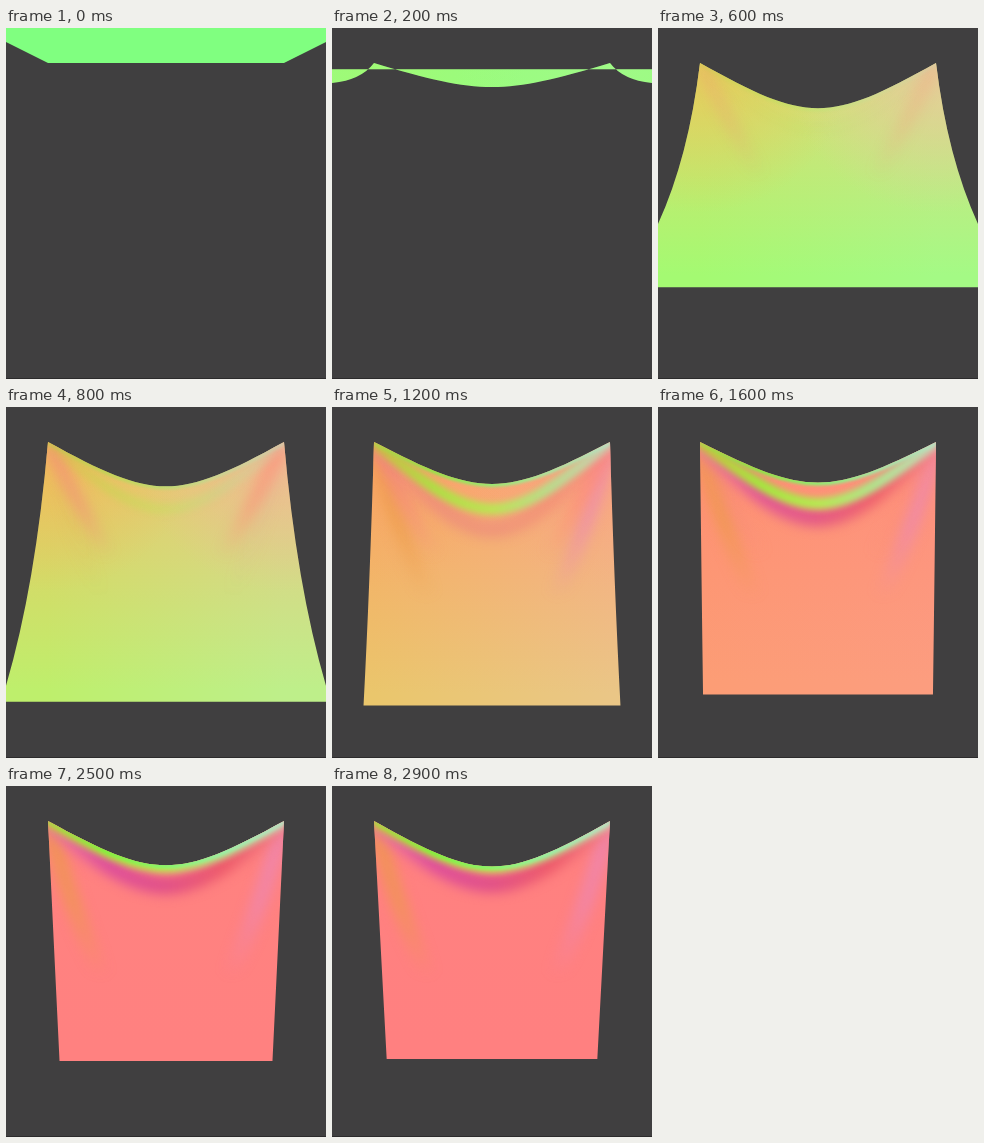
Animation, 320 px wide and 351 px high, one loop 3000 ms. Source, as an HTML page with a canvas:

```html
<!DOCTYPE html>
<html lang="en">
<head>
<meta charset="utf-8">
<title>Falling cloth</title>
<style>
  html, body { margin: 0; width: 100%; height: 100%; overflow: hidden; background: #403f40; }
  canvas { display: block; }
</style>
</head>
<body>
<canvas id="stage" width="320" height="351"></canvas>
<script>
const ctx = document.getElementById('stage').getContext('2d');
const WIDTH = 320, HEIGHT = 351, LOOP = 3000, STEP = 100;
const CENTER = 160, HALF = 118, PIN_Y = 35;
const PIN_L = CENTER - HALF, PIN_R = CENTER + HALF;
const HORIZON = 94, EYE_DISTANCE = 433;

// Timing helpers; t is in seconds.
const settle = (t, rate, power) => 1 - Math.exp(-rate * t ** power);
function rise(t, from, to) {
  const k = Math.min(1, Math.max(0, (t - from) / (to - from)));
  return k * k * (3 - 2 * k);
}
const pulse = (t, from, peak, to) => rise(t, from, peak) * (1 - rise(t, peak, to));

// The hem falls and swings away from the viewer, seen in perspective.
function clothShape(t) {
  const fall = 259.5 * settle(t, 2.22, 1.7);
  const depth = 299 / (1 + 1.2 * t ** 3) - 62;
  const scale = EYE_DISTANCE / (EYE_DISTANCE - depth);
  const hemW = HALF * scale;
  const hemY = HORIZON + scale * (fall - HORIZON + PIN_Y);
  const pull = 114 * t * Math.exp(1 - t / 0.35);
  return {
    hemW, hemY,
    sag: Math.min(600 * t * t, 43 + 2.5 * Math.cos(2.5 * (t - 0.4))),
    sideW: (HALF + hemW) / 2 - pull * (hemW - HALF) / 120,
    sideY: (PIN_Y + hemY) / 2 + pull
  };
}

// Surface normal shown as a colour: green faces up, red faces the viewer.
function normalColor(degrees, blue, alpha = 1) {
  const a = degrees * Math.PI / 180;
  return `rgba(${128 + 127 * Math.sin(a)}, ${128 + 127 * Math.cos(a)}, ${blue}, ${alpha})`;
}

function fillStage(style) {
  ctx.fillStyle = style;
  ctx.fillRect(0, 0, WIDTH, HEIGHT);
}

function addStops(gradient, colors) {
  colors.forEach((color, i) => gradient.addColorStop(i / (colors.length - 1), color));
  return gradient;
}
const across = (...colors) => addStops(ctx.createLinearGradient(PIN_L, 0, PIN_R, 0), colors);
const down = (y0, y1, ...colors) => addStops(ctx.createLinearGradient(0, y0, 0, y1), colors);
const fadeDown = (rgb, y1) => down(45, y1, `rgba(${rgb},1)`, `rgba(${rgb},.8)`, `rgba(${rgb},0)`);

function softStroke(path, style, width, blur, alpha) {
  if (alpha <= 0) return;
  ctx.save();
  ctx.globalAlpha = alpha;
  ctx.filter = `blur(${blur}px)`;
  ctx.strokeStyle = style;
  ctx.lineWidth = width;
  ctx.stroke(path);
  ctx.restore();
}

// A fold hanging between both pins.
function swag(sag) {
  const p = new Path2D(), y = PIN_Y + sag * 4 / 3;
  p.moveTo(PIN_L, PIN_Y);
  p.bezierCurveTo(CENTER - 10, y, CENTER + 10, y, PIN_R, PIN_Y);
  return p;
}

// A fold falling from one pin; side is -1 for left, 1 for right.
function drop(side, x1, y1, x2, y2) {
  const p = new Path2D();
  p.moveTo(CENTER + side * 116, PIN_Y + 3);
  p.quadraticCurveTo(CENTER + side * x1, y1, CENTER + side * x2, y2);
  return p;
}

function clothPath({ hemW, hemY, sideW, sideY, sag }) {
  const p = swag(sag);
  p.quadraticCurveTo(CENTER + sideW, sideY, CENTER + hemW, hemY);
  p.lineTo(CENTER - hemW, hemY);
  p.quadraticCurveTo(CENTER - sideW, sideY, PIN_L, PIN_Y);
  return p;
}

function drawBase(t, hemY) {
  const tiltTop = 90 * settle(t, 1.3, 1.4), tiltHem = 90 * settle(t, 0.65, 2.3);
  const sideBlue = 16 * pulse(t, 0.2, 0.9, 2);
  const blue = 128 - 14 * pulse(t, 0, 1, 2.4) - sideBlue;
  fillStage(down(60, Math.max(61, hemY - 12), normalColor(tiltTop, blue), normalColor(tiltHem, blue + sideBlue / 2)));

  ctx.globalCompositeOperation = 'lighter';
  fillStage(across('#000', `rgb(0, 0, ${2 * sideBlue})`));
  ctx.globalCompositeOperation = 'source-over';

  const glow = 0.8 * pulse(t, 0.1, 0.4, 1.4);
  for (const [x, tint] of [[PIN_L, 85], [PIN_R, 165]]) {
    const color = k => normalColor(tiltTop + 15, tint, glow * k);
    fillStage(addStops(ctx.createRadialGradient(x, PIN_Y, 0, x, PIN_Y, 150), [color(1), color(0.5), color(0)]));
  }
}

function drawFolds(t, sag) {
  const stripe = 0.7 * rise(t, 0.7, 1.3), ray = 0.8 * pulse(t, 0.4, 1, 2.2);
  const sides = [[-1, '235,155,70', '245,138,125'], [1, '235,135,185', '255,140,118']];
  for (const [side, stripeColor, rayColor] of sides) {
    softStroke(drop(side, 100, 110, 62, 195), fadeDown(stripeColor, 190), 17, 6, stripe);
    softStroke(drop(side, 94, 85, 58, 150), fadeDown(rayColor, 150), 15, 6, ray);
  }

  const bandSag = 60 + 27 * Math.exp(-1.4 * (t - 1.2));
  const limeSag = 67 - 21 * rise(t, 1.2, 2.4);
  softStroke(swag(bandSag), across('#e878a0', '#dc4c9c', '#de4c88', '#ec5868', '#f08088'), 18, 6, 0.95 * rise(t, 0.9, 1.8));
  softStroke(swag(limeSag), across('#c8c040', '#a4e83c', '#b4ec50', '#b0e490', '#c8d4b8'), 11, 3, rise(t, 0.5, 1.4));
  softStroke(swag(sag), across('#b0d048', '#80f040', '#80f870', '#98f0a8', '#b8e0c0'), 6, 1.5, 0.9 * rise(t, 0.3, 1.4));
}

function draw(t) {
  const shape = clothShape(t);
  fillStage('#403f40');
  ctx.fillStyle = '#2c2b2c';
  ctx.fillRect(0, HEIGHT - 1, WIDTH, 1);
  ctx.save();
  ctx.clip(clothPath(shape));
  drawBase(t, shape.hemY);
  drawFolds(t, shape.sag);
  ctx.restore();
}

function tick() {
  draw(Math.floor(performance.now() % LOOP / STEP) * STEP / 1000);
  requestAnimationFrame(tick);
}
tick();
</script>
</body>
</html>
```
